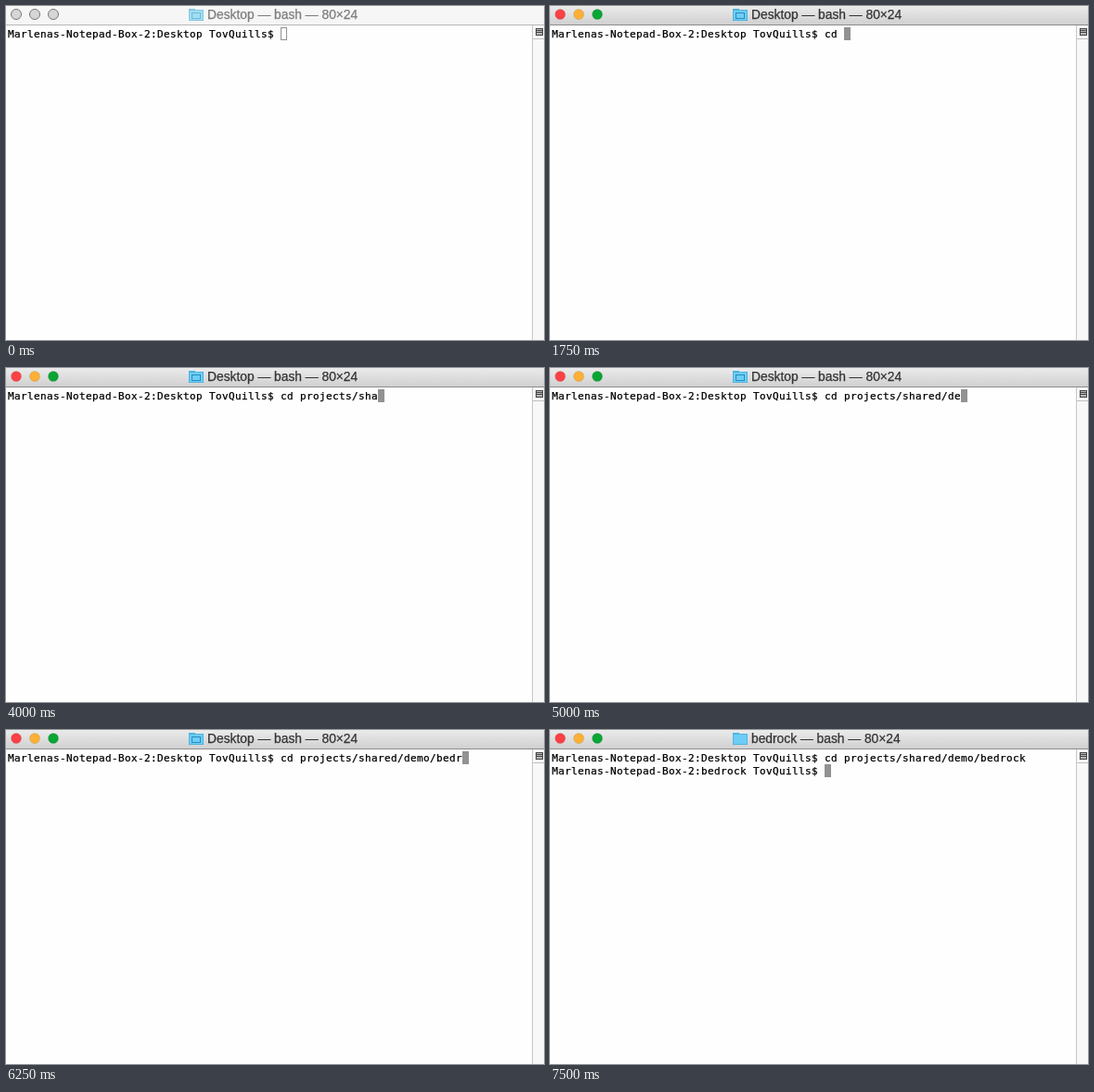
Write an HTML page with a canvas that moves like this. It is 580x361 px and loops after 8 s.

```html
<!DOCTYPE html>
<html lang="en">
<head>
<meta charset="utf-8">
<title>Terminal</title>
<style>
  html, body { margin: 0; width: 100%; height: 100%; overflow: hidden; background: #fefefe; }
  canvas { display: block; }
</style>
</head>
<body>
<canvas id="stage" width="580" height="361"></canvas>
<script>
const ctx = document.getElementById('stage').getContext('2d');
const LOOP = 8000, TICK = 250;
const CELL = 7, ROW = 14, LEFT = 2, TOP = 23;
const ACTIVE_AT = 250, POINTER_GONE_AT = 1000, ENTER_AT = 7000;
const prompt = folder => `Marlenas-Notepad-Box-2:${folder} TovQuills$ `;

// Each burst types its text evenly from start to end, updated once per tick.
const bursts = [
  { text: 'cd ', start: 1250, end: 1750 },
  { text: 'proje', start: 2250, end: 2750 },
  { text: 'cts/share', start: 3000, end: 4250 },
  { text: 'd/demo/', start: 4250, end: 5500 },
  { text: 'bedrock', start: 5500, end: 6750 }
];

function typedText(t) {
  return bursts.map(({ text, start, end }) => {
    const progress = Math.min(1, Math.max(0, (t - start) / (end - start)));
    return text.slice(0, Math.floor(text.length * progress));
  }).join('');
}

function rect(x, y, w, h, color) {
  ctx.fillStyle = color;
  ctx.fillRect(x, y, w, h);
}

function frame(x, y, w, h, color) {
  ctx.strokeStyle = color;
  ctx.lineWidth = 1;
  ctx.strokeRect(x + .5, y + .5, w - 1, h - 1);
}

// A hairline outline gives the text its slightly heavy screen weight.
function label(text, x, y, color) {
  ctx.fillStyle = ctx.strokeStyle = color;
  ctx.lineWidth = .25;
  ctx.fillText(text, x, y);
  ctx.strokeText(text, x, y);
}

function drawLight(x, fill, edge) {
  ctx.beginPath();
  ctx.arc(x, 9, 5.5, 0, 2 * Math.PI);
  ctx.fillStyle = fill;
  ctx.strokeStyle = edge;
  ctx.lineWidth = 1;
  ctx.fill();
  ctx.stroke();
}

function drawFolder(active, isDesktop) {
  const edge = active ? '#4fb4e0' : '#86c8e3';
  rect(197, 3, 7, 2, edge);
  rect(197, 4, 16, 12, edge);
  rect(198, 5, 14, 10, active ? '#6dcdf6' : '#a0def5');
  if (isDesktop) frame(200, 7, 10, 7, active ? '#278dbd' : '#6fb9d6');
}

function drawTitleBar(active, folder) {
  const shade = ctx.createLinearGradient(0, 0, 0, 20);
  shade.addColorStop(0, active ? '#ebebeb' : '#f7f7f7');
  shade.addColorStop(1, active ? '#d0d0d0' : '#f5f5f5');
  rect(0, 0, 580, 20, shade);
  rect(0, 20, 580, 1, active ? '#8c8c8c' : '#b8b8b8');

  ['#fd4145', '#fdb035', '#09a635'].forEach((color, i) =>
    drawLight(11 + 20 * i, active ? color : '#d6d6d6', active ? 'rgba(0,0,0,.1)' : '#777'));

  drawFolder(active, folder === 'Desktop');
  ctx.font = '13.8px "Liberation Sans", Arial, sans-serif';
  label(`${folder} — bash — 80×24`, 217, 14, active ? '#333' : '#7c7c7c');
}

function drawScrollBar() {
  rect(567, 21, 13, 340, '#f8f8f8');
  rect(567, 21, 1, 340, '#c6c6c6');
  rect(568, 35, 12, 1, '#c0c0c0');
  rect(571, 24, 8, 8, '#b8b8b8');
  frame(571, 24, 8, 8, '#444');
  for (const y of [26, 28]) rect(572, y, 6, 1, '#444');
}

function drawLine(text, row) {
  ctx.font = '11px "DejaVu Sans Mono", monospace';
  [...text].forEach((char, i) => label(char, LEFT + CELL * i, TOP + ROW * row + 11, '#000'));
}

function drawCaret(column, row, active) {
  const box = active ? rect : frame;
  box(LEFT + CELL * column, TOP + ROW * row, CELL, ROW, '#929292');
}

function drawPointer(x, y) {
  const arrow = new Path2D(`M${x} ${y}v14l3-3 2.5 6 2.5-1-2.5-5.5h4z`);
  ctx.fillStyle = '#000';
  ctx.strokeStyle = '#fff';
  ctx.lineWidth = 1;
  ctx.fill(arrow);
  ctx.stroke(arrow);
}

function draw(time) {
  const t = Math.floor(time / TICK) * TICK;
  const active = t >= ACTIVE_AT, entered = t >= ENTER_AT;
  const lines = [prompt('Desktop') + typedText(t)];
  if (entered) lines.push(prompt('bedrock'));

  rect(0, 0, 580, 361, '#fefefe');
  drawTitleBar(active, entered ? 'bedrock' : 'Desktop');
  drawScrollBar();
  lines.forEach(drawLine);
  drawCaret(lines.at(-1).length, lines.length - 1, active);
  if (active && t < POINTER_GONE_AT) drawPointer(380 - 3 * (t / TICK), 54);
}

const start = performance.now();
function tick() {
  draw((performance.now() - start) % LOOP);
  requestAnimationFrame(tick);
}
tick();
</script>
</body>
</html>
```
